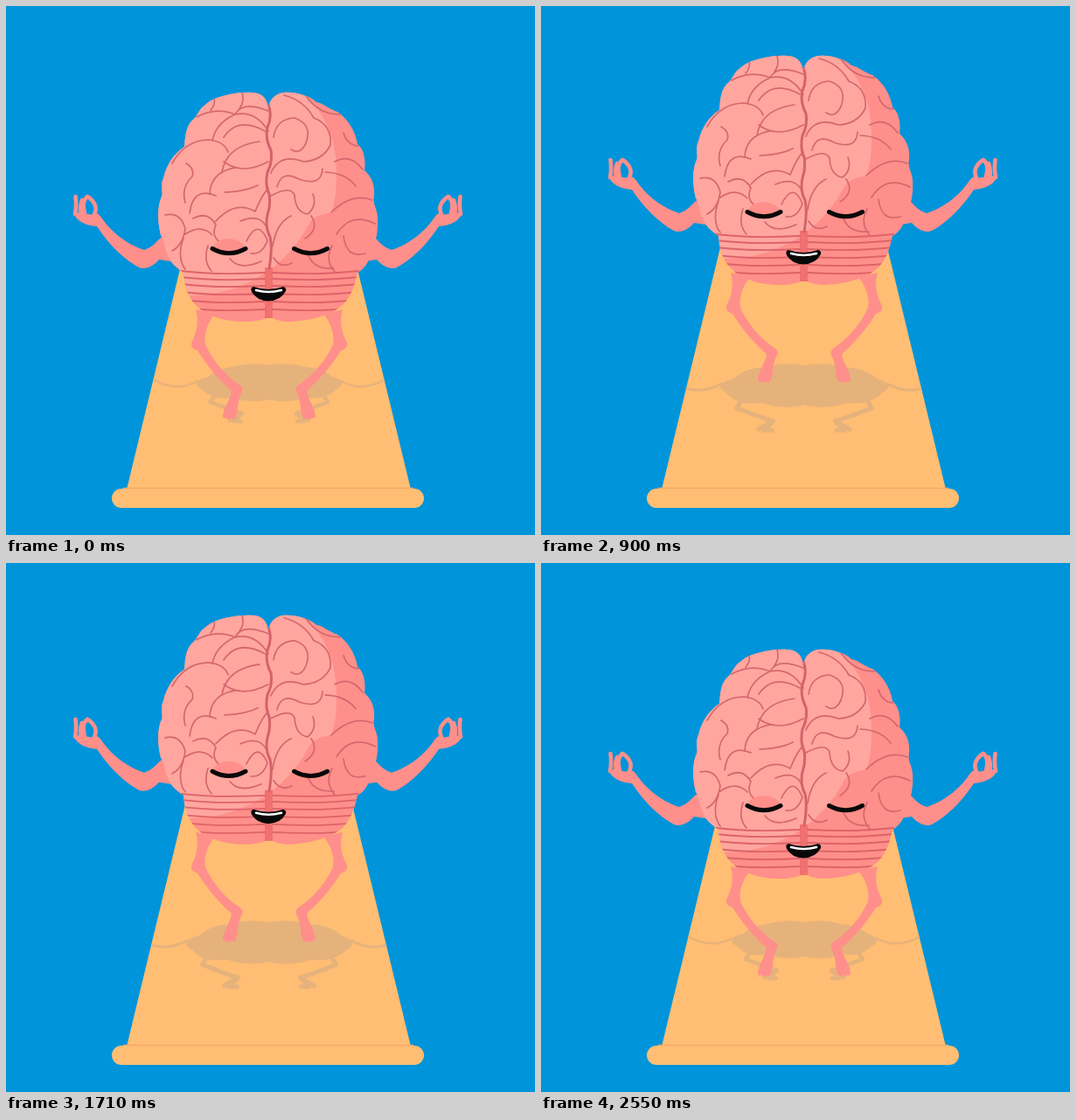
Write an HTML page that moves like this. It is 605 by 605 pixels and loops after 2580 ms.

```html
<!DOCTYPE html>
<html lang="en">
<head>
<meta charset="utf-8">
<title>Meditating brain</title>
<style>
  html, body { margin: 0; width: 100%; height: 100%; overflow: hidden; background: #0094da; }
  svg { display: block; width: 100%; height: 100%; }
  .line { fill: none; stroke-linecap: round; stroke-linejoin: round; }
  .groove { stroke: #d4686e; stroke-width: 1.7; }
  .limb { fill: #ff8f8b; }
  .finger { stroke: #ff8f8b; stroke-width: 4.6; }
</style>
</head>
<body>
<svg viewBox="0 0 605 605">
  <defs>
    <path id="mat" d="M206 272H395L463 553H138Z"/>
    <path id="outline" d="M300 116C298 104 291 99 281 99C268 98 238 102 228 113C221 117 220 124 215 129
      C206 136 205 147 204 161C193 168 184 180 180 197C176 205 180 214 178 218C173 228 173 246 177 262
      C181 266 181 278 185 285C188 294 196 300 203 305C204 320 208 334 219 344C232 356 255 362 279 361
      C290 360 294 358 297 357H305C309 359 314 361 324 361C350 360 375 352 386 341C396 330 399 318 402 305
      C411 300 416 291 417 281C422 273 426 260 425 242C425 232 419 228 421 217C422 206 419 196 410 188
      C412 174 408 162 402 158C400 143 390 128 379 121C371 119 363 111 355 110C347 102 330 98 318 99
      C308 100 302 106 300 116Z"/>
    <clipPath id="inMat"><use href="#mat"/></clipPath>
    <clipPath id="inBrain"><use href="#outline"/></clipPath>

    <g id="arm">
      <path class="limb" d="M104 252C117 272 135 290 152 299C159 302 168 298 175 290L188 292L182 262
        C173 266 172 274 158 279C142 274 124 262 112 246C106 237 104 236 101 239L79 236C76 240 85 251 104 252Z"/>
      <path class="line finger" d="M79.500 218Q81 229 79 238M87 222Q84 230 86 242M93 218C85 225 90 234 91 243M95 219C106 228 103 235 99 243"/>
    </g>
    <path id="leg" class="limb" d="M217 347L239 352C231 362 226 374 228 387C235 403 249 421 267 433
      Q272 436 270 441C264 452 266 461 263 470Q260 475 257 471Q254 475 252 471Q248 473 248 468
      C250 457 257 449 258 440C245 429 230 412 219 394Q209 391 213 383C218 373 221 360 217 347Z"/>
    <g id="shadowLimbs" class="line" stroke="#e6b27c">
      <path stroke-width="2.500" d="M-142 15L-131 19C-121 25 -108 27 -100 26Q-92 25 -82 20"/>
      <path stroke-width="4.500" d="M-62 36L-67 44C-56 48 -44 53 -31 57L-45 65M-31 57L-40 66H-32"/>
    </g>
  </defs>

  <rect width="605" height="605" fill="#0094da"/>
  <use href="#mat" fill="#ffbe73"/>
  <g clip-path="url(#inMat)">
    <g id="shadow">
      <use href="#shadowLimbs"/>
      <use href="#shadowLimbs" transform="scale(-1 1)"/>
      <path fill="#e6b27c" d="M0 2C-12 -1 -30 0 -43 4C-58 5 -65 11 -70 15C-84 18 -87 25 -77 29
        C-70 38 -57 41 -42 39C-28 44 -10 44 0 41C14 45 31 43 42 39C60 41 71 36 77 29
        C87 25 84 18 72 15C66 9 57 5 43 4C30 0 12 -1 0 2Z"/>
    </g>
  </g>
  <rect x="121" y="552" width="357" height="22" rx="11" fill="#ffbe73"/>
  <path d="M134 551.500H466" stroke="#f5a96b" stroke-width="1.500"/>

  <g id="body">
    <use href="#arm"/>
    <use href="#arm" transform="translate(599) scale(-1 1)"/>
    <use href="#leg"/>
    <use href="#leg" transform="translate(602) scale(-1 1)"/>
    <g clip-path="url(#inBrain)">
      <rect x="170" y="95" width="260" height="270" fill="#ff8f8a"/>
      <path fill="#ffa69f" d="M160 90H318C358 106 378 142 378 190C378 212 376 226 372 236C357 239 350 242 345 252
        C333 274 318 290 300 303C274 322 240 332 206 331L160 300Z"/>
      <path fill="#f0716f" d="M296 299H305V362H296Z"/>
      <g id="bands" class="line" stroke="#dd6368" stroke-width="1.800"/>
      <g class="line groove">
        <path d="M218 127Q240 115 262 124Q270 108 300 120M237 102Q241 111 234 119M270 99Q273 110 267 117
          M300 143Q285 119 262 124Q240 134 236 154M249 150Q265 126 296 143M190 180Q205 153 232 153Q250 155 254 167
          M247 190Q252 160 290 155M249 178Q270 194 300 178M233 215Q234 190 262 185M250 213Q275 212 288 205"/>
        <path d="M210 237Q214 206 240 217M205 225Q200 207 213 195Q216 186 206 180M240 246Q262 222 285 235Q293 215 300 209
          M214 243Q231 234 240 250Q234 264 246 271M268 246Q291 236 299 255M275 269Q288 242 299 268Q293 285 280 283
          M182 239Q200 235 205 255Q202 274 190 280M205 261Q223 249 236 262M203 265Q195 288 205 301M231 274Q225 292 235 303M256 289Q267 303 292 292"/>
        <path d="M306 150Q309 129 330 128Q351 135 343 157Q336 171 326 164M318 102Q341 108 352 128M344 104Q358 124 382 124
          M352 128Q373 136 371 159Q362 177 340 178Q313 168 303 191M310 207Q315 187 335 198Q361 207 362 186
          M303 217Q325 205 330 216Q331 236 345 238Q356 229 351 215M386 145Q390 159 403 160"/>
        <path d="M376 178Q394 168 408 187M365 190Q389 191 400 206M372 236Q396 213 419 222M326 240Q309 248 305 275
          M349 240Q359 255 342 266M378 261Q394 235 422 249M345 283Q351 302 375 300M386 263Q389 289 411 283
          M306 288Q314 301 327 294M373 274Q364 291 376 304"/>
      </g>
      <path class="line" stroke="#d4626a" stroke-width="3" d="M300 112Q305 126 299 139Q296 151 303 165Q305 179 299 190Q296 205 301 215Q303 228 299 239Q296 253 302 264Q305 277 301 300"/>
    </g>
    <g id="eye">
      <path fill="#ff8f8a" d="M235 277Q241 266 255 266Q269 267 275 277Q255 290 235 277Z"/>
      <path class="line" stroke="#080808" stroke-width="5" d="M236 277.500Q255 288 274 277.500"/>
    </g>
    <use href="#eye" x="93.500"/>
    <path fill="#080808" d="M283 321Q300 327 317 321Q321 322 320 326Q314 337 300 337.500Q287 337 281 327Q279 322 283 321Z"/>
    <path class="line" stroke="#fff" stroke-width="2.600" d="M286 325Q300 329 315 325"/>
  </g>
</svg>
<script>
  const byId = id => document.getElementById(id);
  const body = byId("body"), shadow = byId("shadow");
  const LOOP = 2580, STEP = 60, STEPS = 42, RISE = 2.8;

  // Curved stripes on both halves of the cerebellum
  let bands = "";
  for (const y of [305, 312, 320, 329, 338, 347]) {
    bands += `M200 ${y - 2}Q240 ${y + 3} 296 ${y}M403 ${y - 2}Q360 ${y + 3} 305 ${y}`;
  }
  byId("bands").innerHTML = `<path d="${bands}"/>`;

  // Steady rise and fall in steps; the highest pose lasts half a step longer
  function draw(now) {
    const t = now % LOOP;
    const step = t < 1350 ? Math.min(21, Math.floor(t / STEP)) : 22 + Math.floor((t - 1350) / STEP);
    const lift = RISE * Math.min(step, STEPS - step);
    body.setAttribute("transform", `translate(0 ${-lift})`);
    shadow.setAttribute("transform", `translate(301 409) scale(${1 + lift * 0.0037})`);
    requestAnimationFrame(draw);
  }
  draw(0);
</script>
</body>
</html>
```
